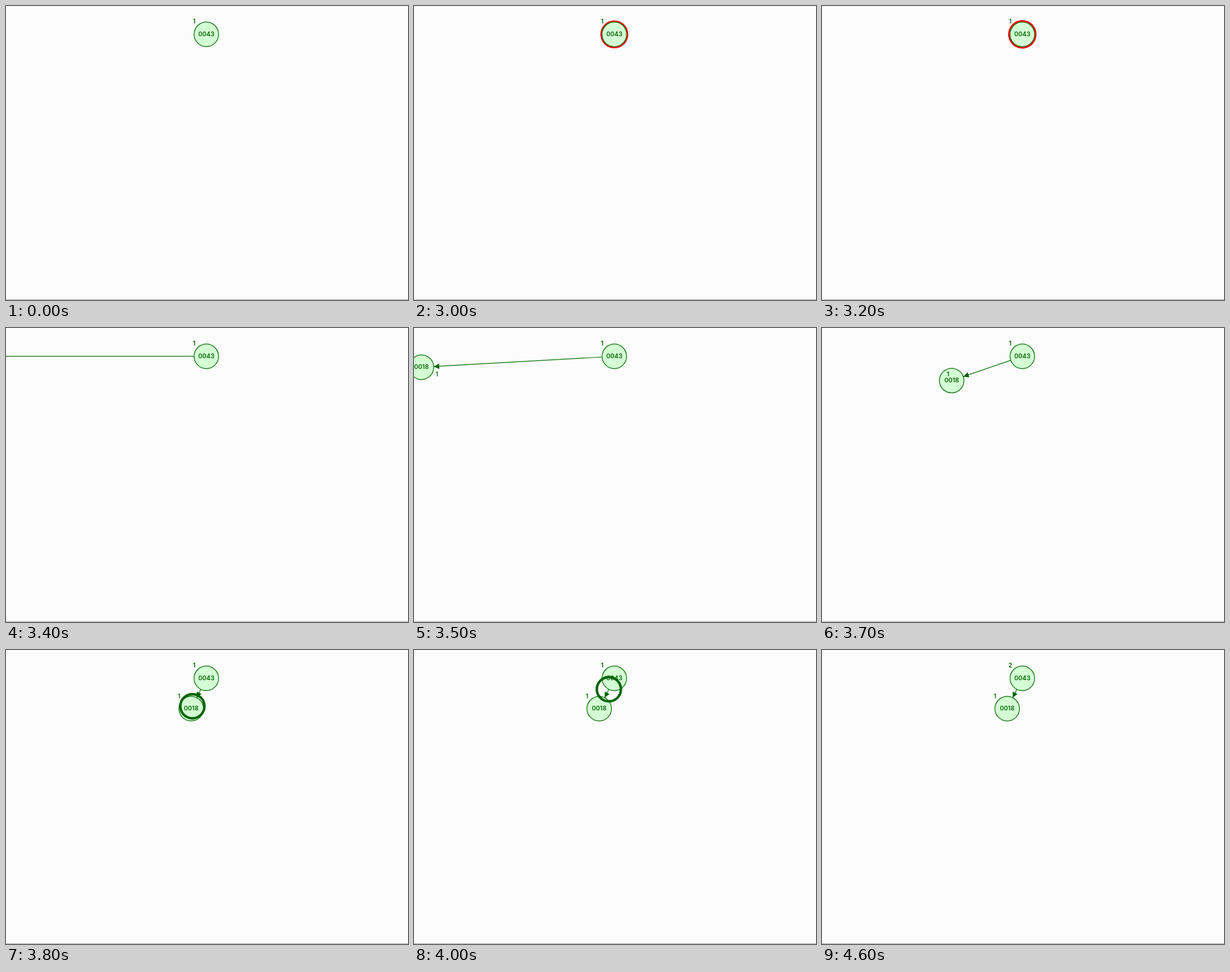
An HTML page for the animation above (5000 ms loop, 600 by 438 pixels).

```html
<!DOCTYPE html>
<html lang="en">
<head>
<meta charset="utf-8">
<title>AVL tree insertion</title>
<style>
  html, body { margin: 0; width: 100%; height: 100%; overflow: hidden; background: #fcfcfc; }
  svg { display: block; width: 100vw; height: 100vh; }
  text { font: 600 9.15px Inter, sans-serif; text-anchor: middle; fill: #006400; }
  .node { fill: #d4fed4; stroke: #1c7d1c; stroke-width: 1.25; }
  .ring { fill: none; stroke: #006400; stroke-width: 3.7; }
  .edge { stroke: #1c7d1c; stroke-width: 1.2; }
  .head { fill: #006400; }
</style>
</head>
<body>
<svg viewBox="0 0 600 438">
  <rect y="437" width="600" height="1" fill="#b0b0b0"/>
  <g id="link">
    <line class="edge" id="edge"/>
    <path class="head" id="head" d="M0 0L-8.2 -4L-8.2 4Z"/>
  </g>
  <circle id="glow" cx="299" cy="42.2" fill="#f00"/>
  <circle class="node" cx="299" cy="42.2" r="18.3"/>
  <text x="299" y="45.2">0043</text>
  <text id="rootHeight" x="281" y="26.3">1</text>
  <g id="child">
    <circle class="node" r="18.3"/>
    <text y="3">0018</text>
  </g>
  <text id="childHeight" y="72.3">1</text>
  <circle class="ring" id="ring" r="18"/>
</svg>
<script>
const LOOP = 5000, STEP = 100, R = 18.3;
const ROOT = [299, 42.2], START = [-138, 42.2], SEAT = [276.4, 87.4];

// Values per step, beginning at the given time
const glow = { from: 3000, values: [20.8, 21.8, 21.2, 20.4] };
const fall = { from: 3400, values: [0, 0.36, 0.556, 0.8, 1] };
const climb = { from: 3800, values: [0.08, 0.36, 0.64, 0.91] };

const $ = id => document.getElementById(id);
const at = (track, t) => track.values[Math.floor((t - track.from) / STEP)];
const mix = (a, b, k) => a + (b - a) * k;
const between = (p, q, k) => [mix(p[0], q[0], k), mix(p[1], q[1], k)];
const show = (el, on) => { el.style.display = on ? "" : "none"; };
const set = (el, attrs) => {
  for (const name in attrs) el.setAttribute(name, attrs[name]);
};

function placeChild(k) {
  const [x, y] = between(START, SEAT, k);
  const angle = Math.atan2(y - ROOT[1], x - ROOT[0]);
  const dx = Math.cos(angle) * R, dy = Math.sin(angle) * R;
  set($("child"), { transform: `translate(${x} ${y})` });
  set($("childHeight"), { x: mix(-92, 258.2, k) });
  set($("edge"), { x1: ROOT[0] + dx, y1: ROOT[1] + dy, x2: x - dx, y2: y - dy });
  set($("head"), {
    transform: `translate(${x - dx} ${y - dy}) rotate(${angle * 180 / Math.PI})`
  });
}

function draw(t) {
  const radius = at(glow, t);
  show($("glow"), radius);
  if (radius) set($("glow"), { r: radius });

  const inserted = t >= fall.from;
  for (const id of ["link", "child", "childHeight"]) show($(id), inserted);
  if (inserted) placeChild(at(fall, t) ?? 1);

  const k = at(climb, t);
  show($("ring"), k);
  if (k) {
    const [cx, cy] = between(SEAT, ROOT, k);
    set($("ring"), { cx, cy });
  }

  const label = $("rootHeight");
  label.textContent = t < 4200 ? "1" : "2";
  label.style.fill = t >= 4200 && t < 4600 ? "#f00" : "";
}

const begin = performance.now();
function tick() {
  draw((performance.now() - begin) % LOOP);
  requestAnimationFrame(tick);
}
tick();
</script>
</body>
</html>
```
